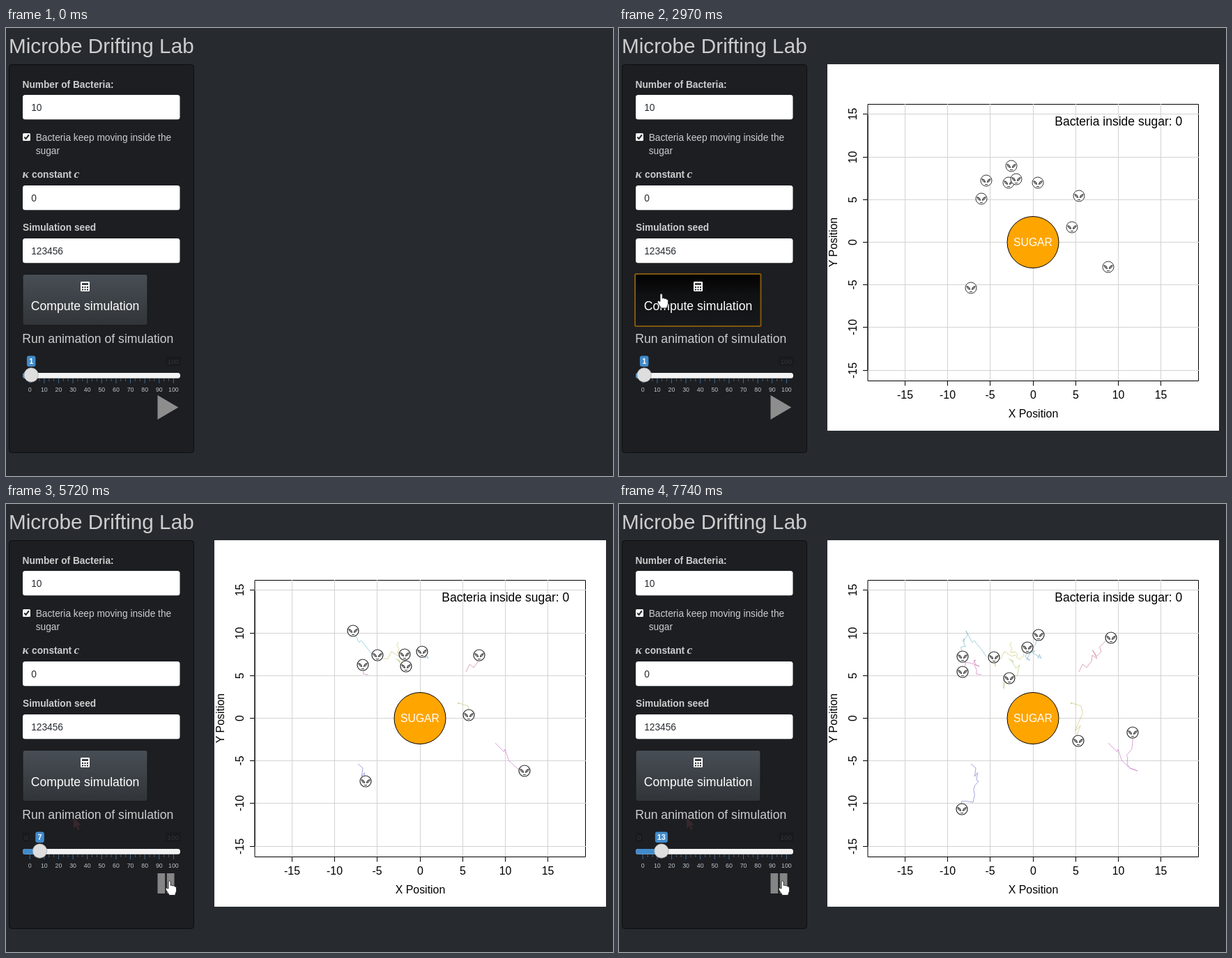
Write an HTML page that moves like this. It is 871 by 643 pixels and loops after 8000 ms.

```html
<!DOCTYPE html>
<html lang="en">
<head>
<meta charset="utf-8">
<title>Microbe Drifting Lab</title>
<style>
html, body { margin: 0; width: 100%; height: 100%; overflow: hidden; background: #272b30; }
svg { display: block; width: 871px; height: 643px; }
text { font-family: "Liberation Sans", Arial, sans-serif; font-size: 13.72px; fill: #cdcdcd; }
.bold { font-weight: bold; }
.math { font: italic bold 17.5px "Liberation Serif", serif; }
.value { fill: #272b30; }
.mid { text-anchor: middle; }
.heading { font-size: 17.6px; }
.tick { font-size: 8.8px; fill: #bcc3cc; }
.tiny { font-size: 9.8px; fill: #33363a; }
#plot text { font-size: 15.9px; fill: #000; }
#plot .count { font-size: 17.5px; }
#plot .sugar { fill: #fff; font-size: 15.7px; }
#trails path { fill: none; stroke-width: 1; stroke-opacity: .65; }
</style>
</head>
<body>
<svg viewBox="0 0 871 643">
  <defs>
    <linearGradient id="idle" x2="0" y2="1">
      <stop stop-color="#484e55"/><stop offset=".6" stop-color="#3a3f44"/><stop offset="1" stop-color="#313539"/>
    </linearGradient>
    <linearGradient id="hover" x2="0" y2="1">
      <stop stop-color="#020202"/><stop offset=".4" stop-color="#101112"/><stop offset="1" stop-color="#17181b"/>
    </linearGradient>
    <path id="arrow" d="M.5 .5V16L4 12.7 6.5 18.5 9 17.4 6.6 11.8H11.5Z"/>
    <path id="hand" d="M4.5 12V2Q6 -.5 7.7 2V7.5Q9.5 6.3 10.8 8 12.6 7 13.6 9 16 8.5 16 11V15.5L14 21.5H6L1 14Q-.2 11.5 2 11Z"/>
    <g id="face">
      <circle r="8" fill="#fff"/>
      <path d="M-6 -2.5Q-2 -2 -1.2 2.3Q-5.3 2.2 -6 -2.5ZM6 -2.5Q2 -2 1.2 2.3Q5.3 2.2 6 -2.5ZM-2 5.2Q0 6.2 2 5.2" fill="#aaa" stroke-width=".9"/>
    </g>
  </defs>
  <rect width="871" height="643" fill="#272b30"/>
  <text x="4" y="36" style="font-size:29.7px">Microbe Drifting Lab</text>
  <rect x="4.5" y="52.5" width="265" height="557" rx="4" fill="#1c1e22" stroke="#0c0d0e"/>

  <g id="form">
    <text class="bold" x="23.5" y="86">Number of Bacteria:</text>
    <rect x="24" y="151" width="11" height="11" rx="1.5" fill="#f4f4f4"/>
    <path d="M26.3 156.6L28.6 159 32.8 153.4" fill="none" stroke="#222" stroke-width="2"/>
    <text x="42.7" y="162">Bacteria keep moving inside the</text>
    <text x="42.7" y="181">sugar</text>
    <text class="math" x="23.5" y="215">κ</text>
    <text class="bold" x="37" y="215">constant</text>
    <text class="math" x="97.5" y="215">c</text>
    <text class="bold" x="24" y="291">Simulation seed</text>
  </g>

  <rect id="button" x="24" y="353.5" width="179" height="73" rx="3" stroke="#17191b"/>
  <rect id="focus" x="23" y="353" width="180.5" height="75" rx="1.5" fill="none" stroke="#80570f" stroke-width="2"/>
  <rect x="107" y="364" width="13" height="14" rx="1.2" fill="#fff"/>
  <path d="M109 366.2h9v2.6h-9zM109 371h2v2h-2zm3.5 0h2v2h-2zm3.5 0h2v2h-2zM109 374.4h2v2h-2zm3.5 0h2v2h-2zm3.5 0h2v2h-2z" fill="#202326"/>
  <text class="heading mid" x="113.5" y="405" style="fill:#fff">Compute simulation</text>
  <text class="heading" x="23.2" y="452">Run animation of simulation</text>

  <g id="scale"></g>
  <rect x="229" y="471" width="21.5" height="14" rx="3" fill="#181a1d"/>
  <text class="tiny mid" x="240" y="482">100</text>
  <g id="low">
    <rect x="24" y="471" width="9.5" height="14" rx="3" fill="#181a1d"/>
    <text class="tiny mid" x="28.8" y="482">0</text>
  </g>
  <rect x="24" y="495" width="226" height="7.8" rx="3.5" fill="#f3f3f3"/>
  <rect id="bar" x="24" y="495" height="7.8" rx="3.5" fill="#428bca"/>
  <circle id="knob" cy="498" r="10.2" fill="#dedede" stroke="#a8a8a8" stroke-width=".7"/>
  <rect id="tag" y="470.5" height="15.5" rx="3" fill="#428bca"/>
  <text id="tagText" class="mid bold" y="482.3" style="font-size:10.8px;fill:#fff"></text>

  <path id="play" d="M217.5 527L247.3 544.5 217.5 562Z" fill="#8d8d8d"/>
  <path id="pause" d="M217.5 530h10.7v29h-10.7zM230.8 530h10.7v29h-10.7z" fill="#858585"/>

  <g id="plot">
    <rect x="299" y="52" width="562" height="526" fill="#fff"/>
    <path d="M357 109.5H831.5V506.5H357Z" fill="none" stroke="#000"/>
    <g id="axes"></g>
    <text class="mid" x="594.5" y="559">X Position</text>
    <text class="mid" transform="translate(312.5 307.5) rotate(-90)">Y Position</text>
    <text class="count" x="625.3" y="140">Bacteria inside sugar: 0</text>
    <circle cx="594" cy="307.5" r="37" fill="#ffa500" stroke="#000"/>
    <text class="sugar mid" x="594" y="313">SUGAR</text>
    <g id="trails"></g>
    <g id="heads" fill="none" stroke="#222"></g>
  </g>
  <use id="ghost" href="#arrow" x="96.5" y="449.5" fill="#38272b"/>
  <use id="cursor" fill="#fff" stroke="#222" stroke-width=".9"/>
</svg>
<script>
const $ = id => document.getElementById(id);
const show = (id, on) => $(id).setAttribute('display', on ? 'inline' : 'none');
const set = (id, attrs) => { for (const k in attrs) $(id).setAttribute(k, attrs[k]); };
const add = (id, markup) => $(id).insertAdjacentHTML('beforeend', markup);

const LOOP = 8000, HOVER = 730, CLICK = 1220, PLOT = 2970, LEAVE = 3480, PLAY = 3970;
const RUN = 4720, BEAT = 250;

const cursorStops = [
  { from: 470, shape: 'arrow', x: 20, y: 364 },
  { from: HOVER, shape: 'hand', x: 54.5, y: 380.5 },
  { from: 3220, shape: 'arrow', x: 96.5, y: 449 },
  { from: LEAVE, shape: 'arrow', x: 229, y: 532.5 },
  { from: 3720, shape: 'hand', x: 228.5, y: 540 }
];

// Each walker has a hue and passes four points; between them it strays at random.
const anchorSteps = [1, 6, 10, 13];
const walkers = [
  '60: 563,198 572,216 581,218 586,206',
  '192: 527,219 498,182 495,202 493,219',
  '315: 520,245 512,231 503,228 493,241',
  '80: 559,222 574,233 552,265 560,250',
  '55: 570,217 533,217 540,233 538,220',
  '200: 601,222 597,212 585,223 602,188',
  '335: 660,241 679,217 692,212 706,192',
  '55: 650,286 664,303 657,331 659,340',
  '300: 702,343 744,383 728,361 737,328',
  '240: 505,373 516,398 508,428 492,438'
].map(line => {
  const [hue, path] = line.split(': ');
  return { hue, anchors: path.split(' ').map(p => p.split(',').map(Number)) };
});

function seeded(seed) {
  const v = Math.sin(seed * 127.1 + 31.7) * 43758.5453;
  return v - Math.floor(v) - .5;
}

function position({ anchors }, walker, step) {
  let i = 0;
  while (i < 2 && anchorSteps[i + 1] < step) i++;
  const k = (step - anchorSteps[i]) / (anchorSteps[i + 1] - anchorSteps[i]);
  const stray = 72 * k * (1 - k);
  return anchors[i].map((v, axis) =>
    v + (anchors[i + 1][axis] - v) * k + stray * seeded(walker * 40 + step * 2 + axis));
}

function build() {
  [[96, '10'], [226, '0'], [302, '123456']].forEach(([y, value]) => add('form',
    `<rect x="24" y="${y}" width="225.5" height="35.3" rx="3.5" fill="#fff"/>
     <text class="value" x="36.2" y="${y + 22.6}">${value}</text>`));

  for (let i = 0; i <= 30; i++) {
    const x = 34.2 + i * 20.62 / 3, major = i % 3 === 0;
    add('scale', `<path d="M${x} 503v${major ? 7 : 4}" stroke="${major ? '#3d6a91' : '#50565d'}"/>`);
    if (major) add('scale', `<text class="tick mid" x="${x}" y="522">${i / 3 * 10}</text>`);
  }

  let grid = '', ticks = 'M410.5 506.5H777.5M357 124.5V491.5', labels = '';
  for (let i = -3; i <= 3; i++) {
    const x = Math.round(593.5 + i * 61.2) + .5, y = Math.round(307 - i * 61.2) + .5;
    grid += `M${x} 109V507M357 ${y}H832`;
    ticks += `M${x} 506.5v7M357 ${y}h-7`;
    labels += `<text class="mid" x="${x}" y="531.5">${i * 5}</text>
      <text class="mid" transform="translate(340.5 ${y}) rotate(-90)">${i * 5}</text>`;
  }
  add('axes', `<path d="${grid}" stroke="#d3d3d3"/><path d="${ticks}" stroke="#000"/>${labels}`);

  walkers.forEach(({ hue }, i) => {
    add('trails', `<path id="trail${i}" stroke="hsl(${hue} 45% 62%)"/>`);
    add('heads', `<use id="head${i}" href="#face"/>`);
  });
}

function drawSlider(value) {
  const x = 34.1 + value * 2.06, width = value > 9 ? 18 : 12.5;
  set('bar', { width: x - 24 });
  set('knob', { cx: x });
  set('tag', { x: x - width / 2, width });
  set('tagText', { x });
  $('tagText').textContent = value;
  show('low', value > 3);
}

function drawWalkers(last) {
  set('heads', { 'stroke-width': last > 1 ? 1.15 : .9 });
  walkers.forEach((walker, i) => {
    const trail = Array.from({ length: last }, (_, n) => position(walker, i, n + 1));
    const [x, y] = trail[last - 1];
    set('trail' + i, { d: 'M' + trail.join('L') });
    set('head' + i, { x, y });
  });
}

function draw(t) {
  set('button', { fill: t >= HOVER && t < LEAVE ? 'url(#hover)' : 'url(#idle)' });
  show('focus', t >= CLICK && t < PLAY);
  show('plot', t >= PLOT);
  show('play', t < PLAY);
  show('pause', t >= PLAY);
  show('ghost', t >= LEAVE);

  const stop = cursorStops.filter(s => s.from <= t).pop();
  show('cursor', stop);
  if (stop) set('cursor', { href: '#' + stop.shape, x: stop.x, y: stop.y });

  // The slider and the plot advance at slightly different rates after a quick start.
  const beat = Math.floor((t - RUN) / BEAT), running = beat >= 0;
  drawSlider(running ? Math.min(2 + 2 * beat, Math.floor(3.9 + .8 * beat)) : 1);
  drawWalkers(running ? Math.min(1 + 3 * beat, Math.floor(3.4 + beat * 5 / 6)) : 1);
}

build();
const start = performance.now();
function tick() {
  draw((performance.now() - start) % LOOP);
  requestAnimationFrame(tick);
}
tick();
</script>
</body>
</html>
```
